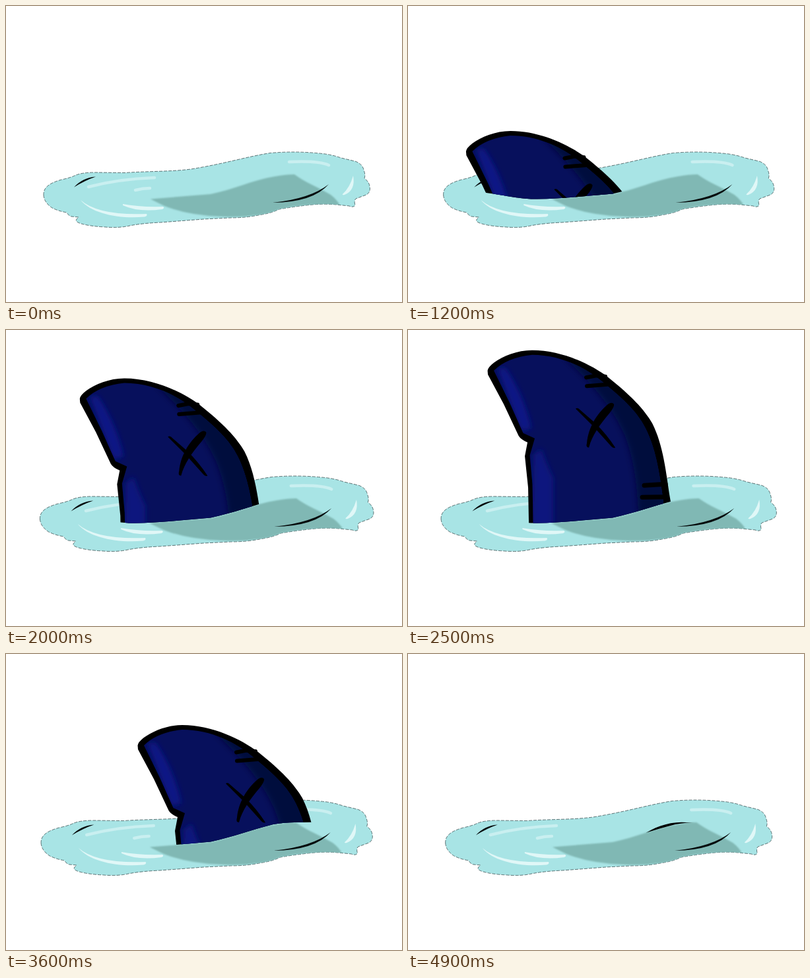
An HTML page that plays this animation: 600 px wide and 450 px high, repeating every 5 s.

```html
<!DOCTYPE html>
<html lang="en">
<head>
<meta charset="utf-8">
<title>Shark fin</title>
<style>
html, body { margin: 0; width: 100%; height: 100%; overflow: hidden; background: #fff; }
svg { display: block; width: 100%; height: 100%; }
.line { fill: none; stroke-linecap: round; }
</style>
</head>
<body>
<svg viewBox="0 0 600 450">
  <defs>
    <filter id="soft" x="-30%" y="-30%" width="160%" height="160%"><feGaussianBlur stdDeviation="4"/></filter>
    <filter id="edge"><feGaussianBlur stdDeviation="0.9"/></filter>
    <clipPath id="above">
      <path d="M0 0H600V255H490Q460 256 437 256Q422 256 405 259C372 267 345 278 310 285.500L258 290Q225 293 195 293.500C160 294 135 283 76 280L0 274Z"/>
    </clipPath>
    <path id="body" d="M130 62Q150 42 188 38C232 38 271 58 298 82C335 112 350 130 360 150C375 180 381 215 387 262V310H189.500V294L188.500 235L184.500 191L192 165L174.500 157L154 111Z"/>
    <clipPath id="inside"><use href="#body"/></clipPath>
    <path id="pool" d="M57 288C56 276 66 269 84 264Q98 261 106 257Q116 253 135 253L180 253.500C215 251 250 252 280 248C330 240 365 229 400 223.500Q440 220 480 224.500Q494 226 508 231L529 236Q540 240 542 249Q545 257 543 262Q550 267 551 274Q553 283 546 287L530 293Q527 296 529 303Q526 307 520 304L500 302Q480 300 455 303Q430 306 414 309Q402 315 385 317.500Q365 322 340 322L300 324L235 329Q210 330 190 333.500Q172 338 150 336Q128 335 114 331Q104 328 107 324L110 321L99 320Q95 319 92 314Q80 312 70 307Q58 299 57 288Z"/>
    <clipPath id="wet"><use href="#pool"/></clipPath>
  </defs>

  <g id="water">
    <use href="#pool" fill="#a8e4e5"/>
    <use href="#pool" fill="none" stroke="#2c4042" stroke-width=".7" stroke-dasharray="5 2"/>
    <g clip-path="url(#wet)">
      <path d="M219 293.500L310 286C345 279 372 265 408 259Q424 256 437 256C453 268 472 275 492 287Q501 294 506 303Q460 299 414 309Q402 315 385 317.500Q355 322 325 320Q275 318 240 304Z" fill="#80b8b4" filter="url(#edge)"/>
    </g>
    <g class="line" stroke="#c9eff0" stroke-width="4.500">
      <path d="M125 275Q170 263 225 261"/>
      <path d="M196 280Q207 277 218 277"/>
      <path d="M429 237Q474 235 489 242"/>
    </g>
    <g fill="#e0f7f7">
      <path d="M113 295Q140 319 213 316Q215 319 210 320.500C172 324 130 316 113 295Z"/>
      <path d="M177 301Q202 306 238 305Q241 307 237 309Q200 314 177 303Z"/>
      <path d="M526 258Q530 280 513 287Q509 288 510 286Q521 276 526 258Z"/>
    </g>
    <path d="M103 275.500Q116 261 136 259.500Q120 265 103 275.500ZM404 299Q461 293 489 271Q465 298.500 404 299Z" fill="#050b0c"/>
  </g>

  <g clip-path="url(#above)">
    <g id="fin">
      <path d="M120.500 62Q121 57 130 50C144 40 165 31 188 31C234 31 278 53 303 72C338 100 358 121 370 142C388 178 391 220 398 262V310H183V294L182 240L177 192L181 171Q171 167 167.500 161L145 113L121 68Z"/>
      <use href="#body" fill="#07105c"/>
      <g clip-path="url(#inside)" filter="url(#edge)">
        <g filter="url(#soft)">
          <path d="M235 40C272 75 309 115 328 160C343 200 348 235 350 310H420V120L320 60Z" fill="#040a3c"/>
          <path d="M135 58L148 58Q176 100 187 150L172 154Z" fill="#091886"/>
          <path d="M190 190L202 180Q208 200 220 225V300H188Z" fill="#09187e"/>
        </g>
      </g>
      <path d="M254 120Q257 117 261 122L284 142Q301 159 314 179Q311 181 306 175L281 147ZM303 113Q309 109 312 113Q313 117 305 127C290 145 279 160 274 179Q269 179 271 172C273 150 285 128 303 113Z"/>
      <g class="line" stroke="#000" stroke-width="6">
        <path d="M270 72.500L285 69.500L299 71M271 85.500L302 83"/>
        <path d="M358 236.500L390 234.500M355 254.500L392 254" stroke-width="7"/>
      </g>
    </g>
  </g>
</svg>
<script>
const LOOP = 5000, STEP = 100, GAP = 400;
// Height of the fin below its high point, every GAP ms
const drops = [264, 252, 219, 159, 98.7, 42.5, 4, 0, 31, 77, 132, 193, 220, 234, 236];
const fin = document.getElementById('fin');
const water = document.getElementById('water');

function dropAt(t) {
  const i = Math.floor(t / GAP), u = t / GAP - i;
  const at = k => drops[Math.max(0, Math.min(drops.length - 1, k))];
  const [a, b, c, d] = [at(i - 1), at(i), at(i + 1), at(i + 2)];
  return b + u / 2 * (c - a + u * (2 * a - 5 * b + 4 * c - d + u * (3 * (b - c) + d - a)));
}

function draw(now) {
  const t = Math.floor(now % LOOP / STEP) * STEP;
  const y = dropAt(t);
  const x = t <= LOOP / 2 ? -0.205 * y : y + 2;
  fin.setAttribute('transform', `translate(${x.toFixed(2)} ${y.toFixed(2)})`);
  const swell = 1 + 0.028 * (1 - Math.abs(t - LOOP / 2) / (LOOP / 2));
  water.setAttribute('transform', `translate(304 0) scale(${swell.toFixed(4)} 1) translate(-304 0)`);
}

const start = performance.now();
function tick() {
  draw(performance.now() - start);
  requestAnimationFrame(tick);
}
tick();
</script>
</body>
</html>
```
